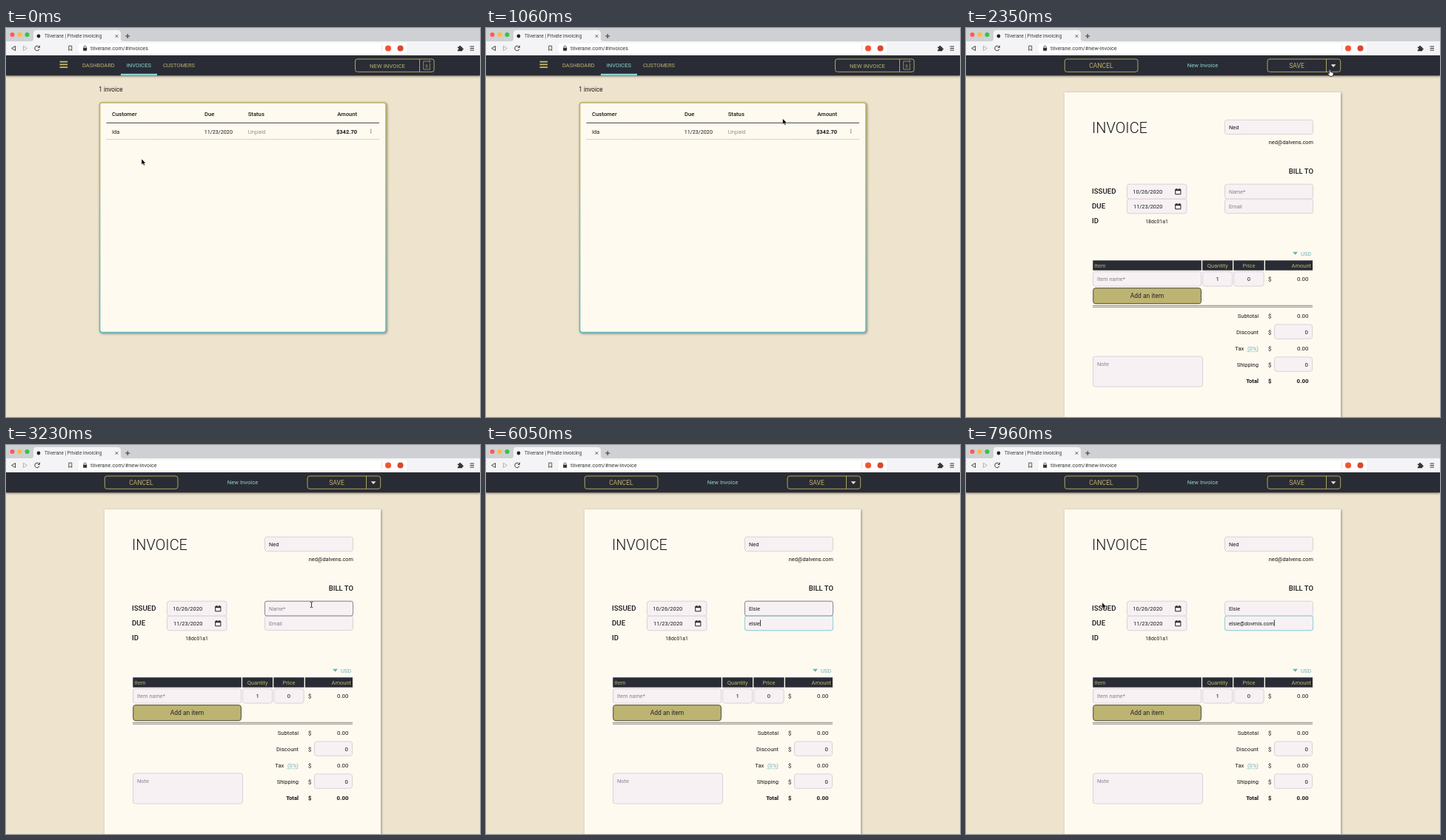
Write an HTML page that moves like this. It is 640 px wide and 526 px high and loops after 7.99 s.

```html
<!DOCTYPE html>
<html lang="en">
<head>
<meta charset="utf-8">
<title>Invoice form</title>
<style>
  html, body { margin: 0; width: 100%; height: 100%; overflow: hidden; background: #eee3cd; }
  svg { display: block; width: 100%; height: 100%; }
  text { font-family: Roboto, "Liberation Sans", sans-serif; white-space: pre; }
  .low { filter: drop-shadow(0 1px 1.5px #0007); }
  .card { filter: drop-shadow(1px 1px 1.5px #0006); }
</style>
</head>
<body>
<svg id="stage" viewBox="0 0 640 526">
  <defs>
    <linearGradient id="edge" x2="0" y2="1">
      <stop stop-color="#bfb35f"/><stop offset="1" stop-color="#68b9bd"/>
    </linearGradient>
  </defs>
</svg>
<script>
const LOOP = 7990;
const DARK = '#292c34', GOLD = '#bdb26f', TEAL = '#8ad5d6', SEA = '#66b3b8',
  INK = '#17181b', GREY = '#85828a', CREAM = '#fffaef', FIELD = '#f7f1f4', LINE = '#d9d1d8';
const stage = document.getElementById('stage');

// Drawing helpers return markup
const text = (x, y, size, str, fill = INK, anchor = 'start', weight = 400, more = '') =>
  `<text x="${x}" y="${y}" font-size="${size}" fill="${fill}" text-anchor="${anchor}" font-weight="${weight}" ${more}>${str}</text>`;
const box = (x, y, w, h, fill, stroke = 'none', r = 0, more = '') =>
  `<rect x="${x}" y="${y}" width="${w}" height="${h}" rx="${r}" fill="${fill}" stroke="${stroke}" ${more}/>`;
const path = (d, fill = 'none', stroke = 'none', width = 1, more = '') =>
  `<path d="${d}" fill="${fill}" stroke="${stroke}" stroke-width="${width}" ${more}/>`;
const dot = (x, y, r, fill) => `<circle cx="${x}" cy="${y}" r="${r}" fill="${fill}"/>`;
const group = (id, ...parts) => `<g id="${id}">${parts.join('')}</g>`;
const field = (x, y, w, h, more) => box(x, y, w, h, FIELD, LINE, 3, more);
const button = (x, y, w, h) => box(x, y, w, h, 'none', GOLD, 3, 'stroke-width=".9"');
const navBar = () => box(0, 37, 640, 27.3, DARK, 'none', 0, 'class="low"');

const chrome = group('chrome',
  box(0, 0, 640, 18, '#cfd0d3'), box(0, 18, 640, 19, '#f4f4f6'),
  path('M33 18Q37 18 37 15V7Q37 3 41 3H151Q155 3 155 7V15Q155 18 159 18Z', '#f4f4f6'),
  dot(8.5, 9, 3, '#fc5b55'), dot(18.5, 9, 3, '#fdbb3c'), dot(28.5, 9, 3, '#30c546'),
  dot(44, 11, 2.4, '#222'),
  text(52, 13.3, 6.4, 'Tilverane | Private invoicing', '#3b3c40'),
  path('M147.7 9.2l3.6 3.6m0-3.6l-3.6 3.6', 'none', '#444', .9),
  path('M161.2 11h6m-3-3v6', 'none', '#333', 1),
  path('M12.5 24.5v6l-5-3z', 'none', '#333', .9),
  path('M23.5 24.5v6l5-3z', 'none', '#aaa', .9),
  path('M44.7 25.7A3.2 3.2 0 1 0 45 28.5M45.4 23.7v2.6h-2.6', 'none', '#333', 1),
  path('M84.8 24.2h4v6.3l-2-1.7-2 1.7z', 'none', '#444', .9),
  box(98, 20.5, 443, 14, '#fff', 'none', 2),
  box(104.2, 26.7, 5, 4, '#333', 'none', .5),
  path('M105.2 27v-1.4a1.5 1.5 0 0 1 3 0V27', 'none', '#333', .8),
  text(114, 30.1, 7.3, '', '#333', 'start', 400, 'id="url"'),
  path('M507.5 22.5v10', 'none', '#ddd', .8),
  dot(516, 27.5, 4, '#f4552f'), dot(532.5, 27.5, 4, '#d9472f'),
  path('M609.8 25.4h2a1.2 1.2 0 1 1 2.3 0h2v2a1.2 1.2 0 1 1 0 2.3v1.6h-6.3v-2a1.1 1.1 0 1 0 0-2.1z', '#333'),
  path('M626.5 25h5.5m-5.5 2.5h5.5m-5.5 2.5h5.5', 'none', '#333', 1));

const list = group('list',
  navBar(),
  path('M72.5 45.7h10.7m-10.7 3.7h10.7m-10.7 3.7h10.7', 'none', '#c9bd70', 1.7),
  text(103, 52.9, 7.5, 'DASHBOARD', GOLD),
  text(162.7, 52.9, 7.6, 'INVOICES', TEAL),
  text(212, 52.9, 7.4, 'CUSTOMERS', GOLD),
  box(155, 61.8, 49, 2.5, TEAL),
  button(471.5, 42, 106.5, 17.3),
  path('M558.5 42v17.3', 'none', GOLD, .9),
  text(515, 53.7, 7.7, 'NEW INVOICE', GOLD, 'middle', 400, 'id="create"'),
  path('M570 45h-6.3v11h8.6v-8.3M571.8 43.6v3m-1.5-1.5h3', 'none', GOLD, .7),
  text(568, 53.2, 6, '$', GOLD, 'middle'),
  text(125.3, 85.6, 8.2, '1 invoice'),
  box(126.6, 101, 386.4, 310.6, CREAM, 'url(#edge)', 3, 'stroke-width="1.7" class="card"'),
  text(143, 118.6, 7.7, 'Customer', INK, 'start', 500),
  text(268, 118.6, 7.7, 'Due', INK, 'start', 500),
  text(326.7, 118.6, 7.7, 'Status', INK, 'start', 500),
  text(474, 118.6, 7.6, 'Amount', INK, 'end', 500),
  path('M135.5 128.3H504', 'none', '#444', 1),
  text(143, 142.6, 7.5, 'Ida'),
  text(267.7, 142.6, 7.2, '11/23/2020'),
  text(326.7, 142.6, 7.7, 'Unpaid', '#96938f'),
  text(474, 142.6, 7.5, '$342.70', INK, 'end', 700),
  dot(492.7, 137.2, .7, '#666'), dot(492.7, 139.5, .7, '#666'), dot(492.7, 141.8, .7, '#666'),
  path('M135.5 150.5H504', 'none', '#bdb8ad', .9, 'stroke-dasharray="1.5 .7"'));

const calendar = y =>
  path(`M282.7 ${y + 1.2}h7.2v6.6h-7.2zM284.3 ${y}v1.5m4-1.5v1.5`, 'none', '#222', 1) +
  path(`M282.7 ${y + 2.4}h7.2`, 'none', '#222', 1.5);
const headCell = (x, w, label, at, anchor) =>
  box(x, 314.3, w, 13.4, DARK) + text(at, 323.9, 7.5, label, GOLD, anchor);
const totalRow = (y, label, value, weight = 400) =>
  text(395, y, 7.6, label, INK, 'end', weight) + text(408, y, 7.6, '$', INK, 'start', weight) +
  (value ? text(462.5, y, 7.9, value, INK, 'end', weight)
    : field(416.5, y - 12.7, 51, 19.4) + text(462, y, 7.9, '0', INK, 'end'));
const ring = (id, y, color) =>
  box(349.5, y, 119, 19.8, 'none', color, 2.5, `id="${id}"`);

const form = group('form',
  navBar(),
  button(133.3, 42, 98.7, 17.3),
  text(182.5, 54, 8.6, 'CANCEL', GOLD, 'middle'),
  text(319.5, 53.2, 7.7, 'New Invoice', TEAL, 'middle'),
  button(407, 42, 98.7, 17.3),
  path('M486.5 42v17.3', 'none', GOLD, .9),
  text(446.5, 54, 8.6, 'SAVE', GOLD, 'middle'),
  path('M492.8 49.3h6.6l-3.3 3.6z', '#f6eedb'),
  box(133, 87, 373, 450, CREAM, 'none', 0, 'class="card"'),
  text(170, 141.7, 20, 'INVOICE', INK, 'start', 300),
  field(349.5, 124.3, 119, 19.4),
  text(355, 136.8, 7.4, 'Ned'),
  text(469, 156.7, 7.35, 'ned@dalvens.com', INK, 'end'),
  text(469, 197, 9.5, 'BILL TO', INK, 'end', 500),
  text(170, 224.2, 9.7, 'ISSUED', INK, 'start', 500),
  text(170, 244.2, 9.7, 'DUE', INK, 'start', 500),
  text(170, 264.2, 9.7, 'ID', INK, 'start', 500),
  field(217.5, 211.2, 80.5, 20), field(217.5, 231.2, 80.5, 19.6),
  text(225.3, 224.2, 7.5, '10/26/2020'), text(226, 244.2, 7.4, '11/23/2020'),
  calendar(217), calendar(237),
  text(257.5, 264, 6.9, '18dc01a1', INK, 'middle'),
  field(349.5, 211.2, 119, 20), field(349.5, 231.2, 119, 19.4),
  ring('nameHover', 211.2, '#8b8a90'),
  ring('nameFocus', 211, TEAL), ring('mailFocus', 231, TEAL),
  text(355, 224.1, 7.2, '', INK, 'start', 400, 'id="name"'),
  text(355, 244.1, 7.2, '', INK, 'start', 400, 'id="mail"'),
  box(0, 0, .8, 8.6, '#111', 'none', 0, 'id="caret"'),
  path('M441 302.8h7l-3.5 4z', SEA),
  text(466.3, 307.9, 7.6, 'USD', SEA, 'end'),
  headCell(171.3, 146.5, 'Item', 173.5, 'start'),
  headCell(319.2, 40.8, 'Quantity', 339.6, 'middle'),
  headCell(361.3, 41.3, 'Price', 382, 'middle'),
  headCell(404, 64, 'Amount', 466, 'end'),
  field(171.5, 329.3, 146, 19.8), field(319.6, 329.3, 40, 19.8), field(361.7, 329.3, 40.4, 19.8),
  text(177, 342.1, 7.3, 'Item name*', GREY),
  text(339.6, 342.1, 7.6, '1', INK, 'middle'), text(382, 342.1, 7.6, '0', INK, 'middle'),
  text(408, 342.1, 7.6, '$'), text(462.5, 342.1, 7.9, '0.00', INK, 'end'),
  box(171.8, 351.7, 145.6, 21, '#bdb473', '#4b4836', 3),
  text(244.5, 365, 8.5, 'Add an item', '#222', 'middle'),
  path('M171 375.3H468M171 377.3H468', 'none', '#7d7b76', .9),
  totalRow(391.6, 'Subtotal', '0.00'),
  totalRow(413.6, 'Discount'),
  text(375.3, 435.6, 7.6, 'Tax', INK, 'end'),
  totalRow(435.6, `<tspan fill="${SEA}">(0%)</tspan>`, '0.00'),
  path('M379 437.6h16', 'none', SEA, .8, 'stroke-dasharray="1 1"'),
  totalRow(457.6, 'Shipping'),
  totalRow(479.6, 'Total', '0.00', 700),
  field(171.5, 444, 148, 41),
  text(177, 457, 7.4, 'Note', GREY));

const cursors = group('mouse',
  path('M0 0V8L1.9 6.3 3.1 9 4.5 8.4 3.4 5.8H5.8Z', '#000', '#fff', .5, 'id="arrow"'),
  path('M-1 1a.9.9 0 0 1 1.8 0V3.3l3.2.7q.9.2.8 1.1L4.4 7.6 3.8 9H0L-3 5.6q.2-1.2 1.2-.7l.8.7Z', '#fff', '#111', .8, 'id="hand"'),
  path('M-1.8-3.6H-.6L0-3 .6-3.6H1.8M0-3V3M-1.8 3.6H-.6L0 3 .6 3.6H1.8', 'none', '#222', .9, 'id="beam"'));

stage.insertAdjacentHTML('beforeend', box(0, 0, 640, 526, '#eee3cd') + list + form + chrome + cursors);

const el = {};
stage.querySelectorAll('[id]').forEach(node => el[node.id] = node);
const show = (id, on) => el[id].style.display = on ? '' : 'none';
const clamp = v => Math.max(0, Math.min(1, v));
const ramp = (t, start, time = 160) => clamp((t - start) / time);

const OPEN = 1720, FOCUS = 3560, TAB = 5280, WAKE = 7410;
const nameKeys = [4360, 4690, 4760, 4840, 5100];
const mailKeys = [5610, 5790, 5870, 5960, 6050, 6230, 6400, 6500, 6590, 6690, 6780, 6870, 6970, 7080, 7130, 7190];
const typed = (str, keys, t) => str.slice(0, keys.filter(k => k <= t).length);

// Each move: start, end, then a quadratic curve
const moves = [
  [20, 1660, [183, 177], [343, 187], [491.5, 56]],
  [2330, 3230, [491.5, 56], [440, 125], [412.5, 216]],
  [WAKE, 7980, [412.5, 216], [300, 224], [183, 213]]
];
function mouseAt(t) {
  const [start, end, a, b, c] = moves.filter(m => t >= m[0]).pop() || moves[0];
  const s = ramp(t, start, end - start), u = s * s * (3 - 2 * s);
  return a.map((v, i) => v * (1 - u) ** 2 + 2 * b[i] * u * (1 - u) + c[i] * u * u);
}

function setInput(id, value, hint) {
  el[id].textContent = value || hint;
  el[id].setAttribute('fill', value ? INK : GREY);
  return value ? el[id].getComputedTextLength() : 0;
}

function draw(t) {
  const opened = t >= OPEN;
  const [x, y] = mouseAt(t);
  const inside = (l, top, r, b) => x > l && x < r && y > top && y < b;
  show('list', !opened);
  show('form', opened);
  el.url.textContent = 'tilverane.com/#' + (t >= 1680 ? 'new-invoice' : 'invoices');

  const onButton = inside(opened ? 407 : 471, 42, opened ? 506 : 578, 59.5);
  const onField = opened && inside(349, 211, 469, 251);
  el.create.setAttribute('fill', onButton ? TEAL : GOLD);
  el.mouse.setAttribute('transform', `translate(${x} ${y})`);
  show('mouse', t < nameKeys[0] || t >= WAKE);
  show('hand', onButton);
  show('beam', onField);
  show('arrow', !onButton && !onField);

  if (opened) {
    const nameWidth = setInput('name', typed('Elsie', nameKeys, t), 'Name*');
    const mailWidth = setInput('mail', typed('elsie@dovmis.com', mailKeys, t), 'Email');
    const inMail = t >= TAB;
    el.nameHover.style.opacity = onField ? 1 : 0;
    el.nameFocus.style.opacity = ramp(t, FOCUS) - ramp(t, TAB);
    el.mailFocus.style.opacity = ramp(t, TAB);
    show('caret', t >= FOCUS);
    el.caret.setAttribute('x', 355.2 + (inMail ? mailWidth : nameWidth));
    el.caret.setAttribute('y', inMail ? 236.4 : 216.4);
  }
}

const began = performance.now();
function tick() {
  draw((performance.now() - began) % LOOP);
  requestAnimationFrame(tick);
}
tick();
</script>
</body>
</html>
```
